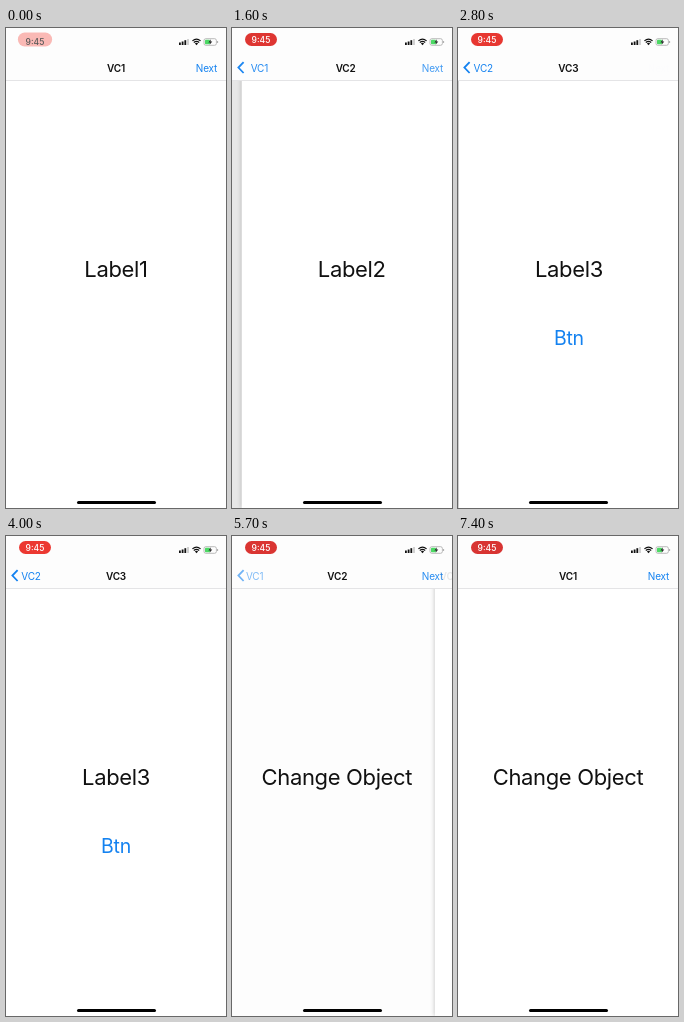
An HTML page that plays this animation: 220 by 480 pixels, repeating every 7500 ms.

```html
<!DOCTYPE html>
<html lang="en">
<head>
<meta charset="utf-8">
<title>Navigation demo</title>
<style>
  html, body { margin: 0; width: 100%; height: 100%; overflow: hidden; background: #fff; }
  #stage { position: relative; width: 220px; height: 480px; overflow: hidden;
    font-family: Inter, Roboto, sans-serif; color: #111; }
  #stage div, #stage svg { position: absolute; }
  .view { left: 0; top: 0; width: 220px; height: 480px; background: #fff;
    box-shadow: 0 0 5px rgba(0, 0, 0, .35); }
  .dim { inset: 0; background: #000; }
  .text { white-space: nowrap; transform: translate(-50%, -50%); line-height: 1; }
  .label { left: 110px; top: 240.5px; font-size: 22px; letter-spacing: -.35px; }
  .btn { left: 110px; top: 310.5px; font-size: 19.5px; letter-spacing: -.3px; }
  .blue { color: #1482f0; }
  .bar { left: 0; top: 0; width: 220px; height: 52px; background: #fdfdfd;
    border-bottom: 1px solid #e4e4e6; overflow: hidden; }
  .title { top: 40px; font-size: 10px; font-weight: 600; letter-spacing: -.2px; }
  .item { top: 40px; font-size: 10px; letter-spacing: -.2px; }
  #pill { left: 13px; top: 5px; width: 32px; height: 13px; border-radius: 6.5px; }
  #clock { left: 29px; top: 12px; font-size: 8.6px; font-weight: 500; }
  #home { left: 71px; top: 472.5px; width: 79px; height: 3px; border-radius: 2px; background: #000; }
</style>
</head>
<body>
<div id="stage">
  <div id="views"></div>
  <div class="bar" id="bar">
    <svg width="220" height="52" fill="none">
      <path id="chevron" d="M11.6 34.2 6.4 39.6 11.6 45" stroke="#1482f0" stroke-width="1.8"/>
      <g fill="#111">
        <rect x="173" y="14.5" width="1.8" height="2.5"/>
        <rect x="175.7" y="13.5" width="1.8" height="3.5"/>
        <rect x="178.4" y="12.2" width="1.8" height="4.8"/>
        <rect x="181.1" y="11" width="1.8" height="6" fill="#ccc"/>
        <path d="M190.5 17.2 188.9 15.5Q190.5 14.2 192.1 15.5Z"/>
      </g>
      <path d="M186.4 12.9Q190.5 9.4 194.6 12.9M187.8 14.5Q190.5 12.2 193.2 14.5" stroke="#111" stroke-width="1.2"/>
      <rect x="198" y="10.7" width="12.4" height="6.6" rx="1.8" stroke="#aaa" stroke-width=".8"/>
      <path d="M211.6 13v2" stroke="#aaa"/>
      <rect x="199" y="11.7" width="5" height="4.6" rx=".8" fill="#4cd964"/>
      <path d="M205 11.2 202.4 14.4H204.2L203.6 16.8 206.3 13.6H204.5Z" fill="#222"/>
    </svg>
    <div id="pill"></div>
    <div id="clock" class="text">9:45</div>
    <div id="next" class="text item blue" style="left:200.5px">Next</div>
  </div>
  <div id="home"></div>
</div>
<script>
const LOOP = 7500, STEP = 100, WIDTH = 220;
const PUSHES = [1250, 2258], POPS = [5400, 6450];
const LABEL_CHANGE = 4300;

const $ = id => document.getElementById(id);
const clamp = v => Math.max(0, Math.min(1, v));
const ramp = (t, start, length) => clamp((t - start) / length);

function add(parent, className, text = '') {
  const el = document.createElement('div');
  el.className = className;
  el.textContent = text;
  parent.append(el);
  return el;
}

// Critically damped spring from 0 to 1
function spring(t, start) {
  const x = Math.max(0, t - start) * 0.014;
  return 1 - (1 + x) * Math.exp(-x);
}

// Opacity of a control held down between two times
const press = (t, down, up) => 1 - 0.8 * (ramp(t, down, 100) - ramp(t, up, 400));

const screens = [1, 2, 3].map(n => {
  const view = add($('views'), 'view');
  const label = add(view, 'text label');
  const button = n === 3 ? add(view, 'text btn blue', 'Btn') : null;
  const dim = add(view, 'dim');
  const title = add($('bar'), 'text title', 'VC' + n);
  const back = add($('bar'), 'text item blue', 'VC' + n);
  return { n, view, label, button, dim, title, back };
});

function drawScreen(s, t, depth, backPress) {
  const o = s.n - 1 - depth;
  s.view.style.transform = `translateX(${o > 0 ? WIDTH * o : 0.3 * WIDTH * o}px)`;
  s.view.style.visibility = Math.abs(o) < 0.999 ? 'visible' : 'hidden';
  s.dim.style.opacity = 0.1 * clamp(-o);
  s.label.textContent = t < LABEL_CHANGE ? 'Label' + s.n : 'Change Object';
  if (s.button) s.button.style.opacity = press(t, 4050, LABEL_CHANGE);

  s.title.style.left = 110 + (o > 0 ? 80 * o + 40 * o * o : 60 * o) + 'px';
  s.title.style.opacity = clamp(o > 0 ? 1.1 - 1.1 * o : 1.2 + 1.5 * o);
  const turn = o + 1;
  s.back.style.left = 25 + (turn > 0 ? 55 : 30) * turn + 'px';
  s.back.style.opacity = clamp(1 - 1.5 * Math.abs(turn)) * backPress;
}

function drawPill(t) {
  const on = ramp(t, 0, 400);
  const glow = 0.5 + 0.5 * Math.cos((t - 2300) / 2100 * 2 * Math.PI);
  const grey = 90 + 165 * on;
  $('pill').style.background =
    `rgba(${214 + 32 * glow}, ${52 + 6 * glow}, ${50 - 2 * glow}, ${0.35 + 0.65 * on})`;
  $('pill').style.transform = `scale(${1.07 - 0.07 * on})`;
  $('clock').style.top = 14 - 2 * on + 'px';
  $('clock').style.color = `rgb(${grey}, ${grey}, ${grey})`;
}

function draw(t) {
  const total = times => times.reduce((sum, start) => sum + spring(t, start), 0);
  const depth = total(PUSHES) - total(POPS);
  const backPress = press(t, 5200, 5500) * press(t, 6300, 6550);
  screens.forEach(s => drawScreen(s, t, depth, backPress));
  $('chevron').style.opacity = clamp(depth) * backPress;
  $('next').style.opacity = clamp(2 - depth) * press(t, 950, 1300) * press(t, 2050, 2600);
  drawPill(t);
}

const begin = performance.now();
function tick() {
  const t = (performance.now() - begin) % LOOP;
  draw(Math.floor(t / STEP) * STEP);
  requestAnimationFrame(tick);
}
tick();
</script>
</body>
</html>
```
